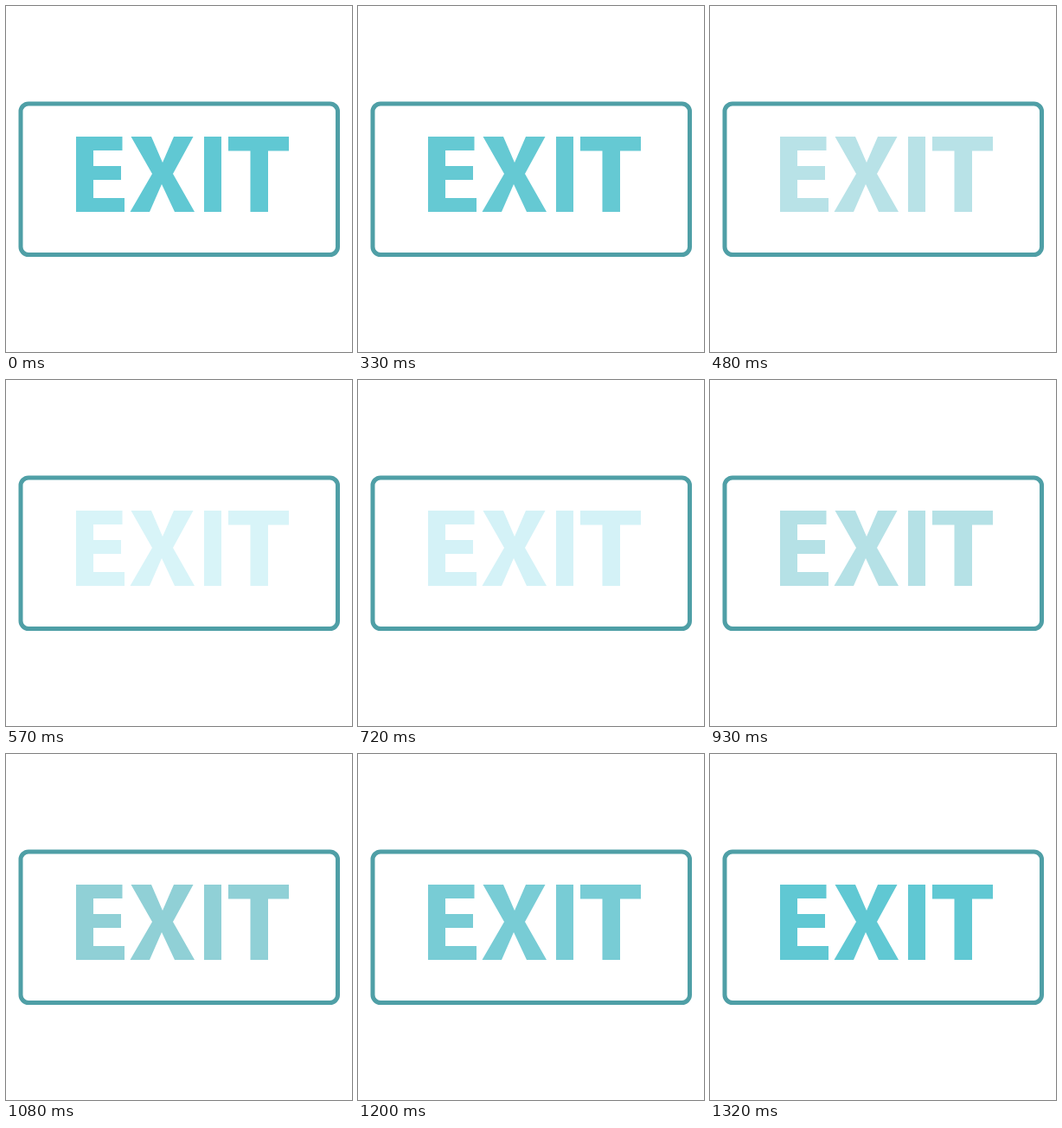
Animation of 400x400 px, one loop 2.7 s. Source, as an HTML page with a canvas:

```html
<!DOCTYPE html>
<html lang="en">
<head>
<meta charset="utf-8">
<title>Exit sign</title>
<style>
  html, body { margin: 0; width: 100%; height: 100%; overflow: hidden; background: #fff; }
  canvas { display: block; width: 100vw; height: 100vh; }
</style>
</head>
<body>
<canvas id="sign" width="400" height="400" role="img" aria-label="EXIT"></canvas>
<script>
const ctx = document.getElementById('sign').getContext('2d');
const LOOP = 2700, STEP = 30, DIM = 0.2;

const letters = new Path2D(
  'M81 151H134.5V167H101V185H133V201H101V222H137V238H81Z' +
  'M144.5 151H168L181 181L194 151H216.5L193 194L218 238H195L180 206L166 238H143.5L169 194Z' +
  'M229 151H249V238H229Z' +
  'M257 151H327V167.5H303V238H282.5V167.5H257Z'
);

// Tint of the letters by brightness level
const tints = [
  [0.2, 216, 244, 248],
  [0.24, 212, 242, 247],
  [0.5, 182, 225, 230],
  [0.7, 143, 208, 214],
  [1, 96, 200, 211]
];

const ramp = (t, from, to) => Math.min(1, Math.max(0, (t - from) / (to - from)));

function level(t) {
  return t < 690
    ? 1 - (1 - DIM) * ramp(t, 320, 568)
    : DIM + (1 - DIM) * ramp(t, 690, 1320);
}

function tint(v) {
  let i = 1;
  while (i < tints.length - 1 && v > tints[i][0]) i++;
  const a = tints[i - 1], b = tints[i];
  const k = ramp(v, a[0], b[0]);
  const mix = n => Math.round(a[n] + (b[n] - a[n]) * k);
  return `rgb(${mix(1)}, ${mix(2)}, ${mix(3)})`;
}

function draw(t) {
  ctx.fillStyle = '#fff';
  ctx.fillRect(0, 0, 400, 400);

  ctx.strokeStyle = '#4f9fa6';
  ctx.lineWidth = 5;
  ctx.beginPath();
  ctx.roundRect(17, 113, 366.5, 174.5, 9);
  ctx.stroke();

  ctx.fillStyle = tint(level(t));
  ctx.fill(letters);
}

const start = performance.now();
function tick() {
  const t = (performance.now() - start) % LOOP;
  draw(Math.floor(t / STEP) * STEP);
  requestAnimationFrame(tick);
}
tick();
</script>
</body>
</html>
```
